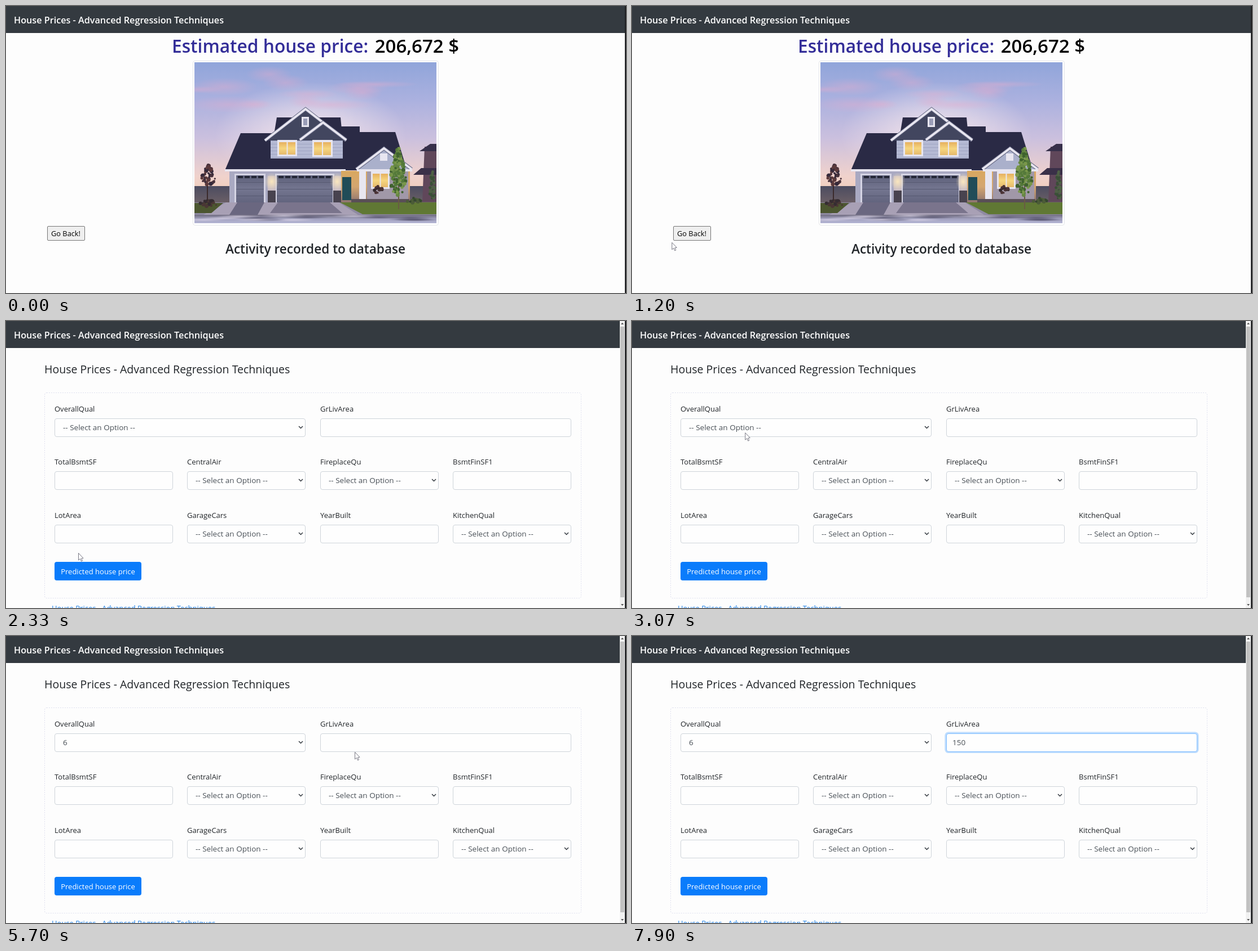
An HTML page with a canvas for the animation above (8 s loop, 1099x510 px).

```html
<!DOCTYPE html>
<html lang="en">
<head>
<meta charset="utf-8">
<title>House Prices</title>
<style>
html, body { margin: 0; width: 100%; height: 100%; overflow: hidden; background: #fdfdfd; }
canvas { display: block; width: 1099px; height: 510px; }
</style>
</head>
<body>
<canvas id="stage" width="1099" height="510"></canvas>
<script>
const LOOP = 8000, BLINK = 530;
const FONT = '"Open Sans", "Noto Sans", sans-serif';
const TITLE = 'House Prices - Advanced Regression Techniques';
const OPTION = '-- Select an Option --';
const INK = '#212529', FIELD_INK = '#495057', TRIM = '#e8e6f0';
const ENTER = 600, PRESS = 2200, FORM = 2330, OPEN = 3570, PICK = 4300, BLUR = 5500, FOCUS = 5940;
const KEYS = [6700, 6800, 7370];
// each move: start, end, x, y
const MOVES = [
  [ENTER, 1330, 73, 418], [1470, 1770, 128, 412], [2400, 3230, 203, 190],
  [4600, 5030, 614, 220], [5030, 5400, 618, 206], [5700, 6000, 622, 190]
];
// a star marks a drop-down
const ROWS = [
  'OverallQual* GrLivArea',
  'TotalBsmtSF CentralAir* FireplaceQu* BsmtFinSF1',
  'LotArea GarageCars* YearBuilt KitchenQual*'
];

const stage = document.getElementById('stage');
let g = stage.getContext('2d');
const clamp = v => Math.min(1, Math.max(0, v));

function rect(x, y, w, h, color) {
  g.fillStyle = color;
  g.fillRect(x, y, w, h);
}

function shade(x, y, w, h, ...stops) {
  const fill = g.createLinearGradient(0, y, 0, y + h);
  stops.forEach((c, i) => fill.addColorStop(i / (stops.length - 1), c));
  rect(x, y, w, h, fill);
}

function paint(fill, stroke, width = 1) {
  if (fill) { g.fillStyle = fill; g.fill(); }
  if (stroke) { g.strokeStyle = stroke; g.lineWidth = width; g.stroke(); }
}

function poly(points, ...style) {
  g.beginPath();
  for (let i = 0; i < points.length; i += 2) g.lineTo(points[i], points[i + 1]);
  paint(...style);
}

function box(x, y, w, h, r, ...style) {
  g.beginPath();
  g.roundRect(x, y, w, h, r);
  paint(...style);
}

// trapezoid between two horizontal edges
function slab(l0, r0, y0, l1, r1, y1, color) {
  poly([l0, y0, r0, y0, r1, y1, l1, y1], color);
}

function text(str, x, y, size, color, weight = 400, align = 'left') {
  g.font = `${weight} ${size}px ${FONT}`;
  g.textAlign = align;
  g.fillStyle = color;
  g.fillText(str, x, y);
}

function seeded(seed) {
  return () => (seed = seed * 16807 % 2147483647) / 2147483647;
}

// soft elliptical glow; rgb is "r,g,b"
function glow(x, y, rx, ry, rgb, alpha) {
  g.save();
  g.translate(x, y);
  g.scale(rx, ry);
  const soft = g.createRadialGradient(0, 0, 0, 0, 0, 1);
  soft.addColorStop(0, `rgba(${rgb},${alpha})`);
  soft.addColorStop(1, `rgba(${rgb},0)`);
  rect(-1, -1, 2, 2, soft);
  g.restore();
}

function foliage(x, y, rx, ry, ...colors) {
  const rnd = seeded(x);
  for (let i = 0; i < rx * ry / 5; i++) {
    const a = rnd() * 6.28, d = Math.sqrt(rnd()), v = Math.sin(a) * d;
    g.beginPath();
    g.arc(x + Math.cos(a) * d * rx * (0.65 + 0.35 * v), y + v * ry, 1.5 + rnd() * 2, 0, 7);
    paint(colors[i % colors.length]);
  }
}

function sky() {
  shade(334, 100, 429, 270, '#90a5da', '#abb1df', '#cbc0de', '#f0d2cc', '#f0c8a2');
  glow(540, 230, 170, 95, '250,236,238', 0.9);
  const rnd = seeded(11);
  for (let i = 0; i < 12; i++) {
    glow(340 + rnd() * 330, 115 + rnd() * 75, 30 + rnd() * 50, 6 + rnd() * 12, '230,172,204', 0.4);
  }
}

function ground() {
  shade(334, 320, 429, 30, '#4c4c60', '#6b5f66');
  rect(334, 349, 429, 37, '#8f8aa2');
  slab(390, 590, 349, 350, 624, 371, '#a8a0b5');
  slab(410, 458, 349, 396, 446, 371, '#6a6780');
  slab(482, 574, 349, 468, 596, 368, '#7a748c');
  slab(334, 385, 350, 334, 364, 368, '#4c5630');
  slab(592, 763, 349, 632, 763, 370, '#607834');
  shade(334, 371, 429, 15, '#706c80', '#a3a2c0', '#b4b5d4');
  const rnd = seeded(5);
  for (let i = 0; i < 14; i++) {
    glow(350 + rnd() * 400, 372 + rnd() * 12, 40, 3, i % 2 ? '75,72,98' : '225,218,236', 0.7);
  }
}

function pane(x, y, w, h) {
  rect(x, y, w, h, TRIM);
  shade(x + 3, y + 4, w - 6, h - 7, '#e6b060', '#f6d67f', '#e5b96c');
  rect(x + w / 2 - 1, y + 3, 2, h - 6, TRIM);
}

function garage(x, w) {
  rect(x - 3, 298, w + 6, 51, '#d5d4e4');
  shade(x, 301, w, 48, '#5d607a', '#747690', '#62647e');
  for (let y = 313; y < 349; y += 12) rect(x, y, w, 1, '#565971');
  for (let i = 3; i < w - 9; i += 12) rect(x + i, 302, 9, 4, '#252838');
}

function gable(cx, top, half, rise, fill) {
  const edge = [cx - half, top + rise, cx, top, cx + half, top + rise];
  poly(edge, fill);
  poly(edge, null, '#686b86', 6);
  poly(edge, null, TRIM, 4);
}

function house() {
  const roof = '#2a2a45', attic = '#42465f', wall = '#b5bad4';
  slab(480, 593, 198, 468, 600, 271, roof);
  rect(590, 214, 37, 20, roof);
  slab(416, 600, 226, 388, 602, 292, roof);
  slab(590, 690, 224, 590, 711, 292, roof);
  rect(469, 233, 128, 38, wall);
  for (let y = 239; y < 271; y += 6) rect(469, y, 128, 1, '#9fa5c3');
  gable(531, 183, 72, 56, attic);
  rect(524, 197, 13, 18, TRIM);
  rect(527, 200, 7, 12, '#9a9db7');
  gable(562, 207, 41, 31, attic);
  slab(469, 600, 271, 469, 602, 291, roof);
  pane(481, 238, 35, 29);
  pane(543, 238, 36, 30);
  rect(396, 293, 200, 56, '#a9a9c2');
  rect(388, 290, 214, 4, TRIM);
  garage(408, 49);
  garage(480, 99);
  for (const x of [464, 580]) {
    rect(x, 302, 14, 47, '#c8bcc4');
    rect(x, 328, 14, 21, '#48434f');
    glow(x + 7, 312, 13, 16, '255,235,190', 0.9);
  }
  shade(594, 293, 122, 56, '#d9a860', '#d4a670', '#8d7470');
  rect(596, 304, 16, 41, '#214c58');
  gable(670, 253, 49, 37, '#aab0cb');
  rect(663, 262, 13, 13, TRIM);
  rect(622, 290, 98, 4, TRIM);
  rect(626, 294, 12, 55, TRIM);
  rect(640, 294, 73, 55, '#a198a8');
  pane(647, 294, 33, 31);
  rect(612, 343, 103, 6, '#594f56');
}

function plants() {
  slab(742, 763, 250, 738, 763, 348, '#60475a');
  slab(752, 763, 245, 733, 763, 258, '#37304a');
  slab(736, 763, 288, 722, 763, 300, '#3a3048');
  rect(356, 310, 2, 40, '#3b2a2c');
  rect(695, 280, 2, 81, '#695b43');
  foliage(756, 319, 7, 25, '#3b4f38', '#4e6045');
  foliage(358, 300, 17, 18, '#47313b', '#5c3a3c', '#34293a');
  foliage(358, 350, 22, 6, '#352c32', '#4a3735');
  foliage(660, 326, 11, 7, '#33282e', '#4b3336');
  foliage(695, 294, 19, 42, '#54793a', '#79974a', '#40632f', '#678844');
  foliage(722, 346, 20, 5, '#35472f', '#4c5c37');
}

function paintPhoto() {
  const sheet = document.createElement('canvas'), screen = g;
  sheet.width = stage.width;
  sheet.height = stage.height;
  g = sheet.getContext('2d');
  g.beginPath();
  g.rect(334, 100, 429, 286);
  g.clip();
  sky();
  ground();
  house();
  plants();
  g = screen;
  return sheet;
}
const photo = paintPhoto();

function pointer(t) {
  if (t < ENTER || t >= KEYS[0]) return null;
  let x = -12, y = 476;
  for (const [from, to, nx, ny] of MOVES) {
    const ease = 1 - (1 - clamp((t - from) / (to - from))) ** 2;
    x += (nx - x) * ease;
    y += (ny - y) * ease;
  }
  return { x, y };
}

const inside = (p, x, y, w, h) => p && p.x >= x && p.x <= x + w && p.y >= y && p.y <= y + h;

const POINTERS = {
  arrow() {
    poly([0.5, 0.5, 0.5, 13, 3.5, 10.5, 5.5, 15, 7.5, 14, 5.5, 10, 9, 9.5, 0.5, 0.5], '#fff', '#777783');
  },
  hand() {
    box(-4, 7, 12, 10, 4, '#fff', '#777783');
    box(-1.5, 0.5, 3, 11, 1.5, '#fff', '#777783');
    rect(-1, 8, 8, 5, '#fff');
  },
  beam() {
    rect(-0.5, -7, 1, 15, '#333');
    for (const y of [-7, 7]) rect(-3, y, 6, 1, '#333');
  }
};

function navbar(w) {
  rect(0, 0, w, 48, '#343a40');
  text(TITLE, 14, 31, 16.2, '#fff', 600);
}

function resultPage(t, p) {
  navbar(1097);
  text('Estimated house price:', 294, 83, 31.7, '#332d98', 600);
  text('206,672 $', 803, 83, 33, '#000', 600, 'right');
  box(331.5, 97.5, 435, 292, 3.5, '#fff', '#e3e5e9');
  g.drawImage(photo, 0, 0);
  const over = inside(p, 73, 391, 67, 26);
  const fill = t >= PRESS ? '#f5f5f5' : over ? '#e4e4e4' : '#efefef';
  box(73.5, 391.5, 66, 25, 1.5, fill, over ? '#5c5c5c' : '#767676');
  text('Go Back!', 106, 409, 12.8, '#000', 400, 'center');
  text('Activity recorded to database', 548.5, 440, 22.6, INK, 600, 'center');
  return over ? 'hand' : 'arrow';
}

function field(label, x, y, w, isSelect, value, focus) {
  text(label, x, y - 12, 13, INK);
  if (focus > 0) box(x - 0.8, y - 0.8, w + 1.6, 34, 4.5, null, `rgba(0,123,255,${0.25 * focus})`, 3.6);
  box(x + 0.5, y + 0.5, w - 1, 32, 3.5, '#fefefe', focus > 0.5 ? '#80bdff' : '#ced4da');
  text(value, x + (isSelect ? 15 : 11), y + 21, 13.5, FIELD_INK);
  if (isSelect) poly([x + w - 12, y + 14, x + w - 8.5, y + 17.5, x + w - 5, y + 14], null, '#343a40', 1.5);
}

function fields(t, typed) {
  const values = { OverallQual: t >= PICK ? '6' : OPTION, GrLivArea: typed };
  const focus = {
    OverallQual: t < BLUR ? clamp((t - OPEN) / 130) : 0,
    GrLivArea: clamp((t - FOCUS) / 150)
  };
  ROWS.forEach((row, r) => row.split(' ').forEach((name, i, all) => {
    const step = 941.3 / all.length, label = name.replace('*', ''), isSelect = label !== name;
    field(label, Math.round(86 + i * step), Math.round(173 + r * 94.3), Math.round(step - 25.5),
      isSelect, values[label] ?? (isSelect ? OPTION : ''), focus[label] || 0);
  }));
}

function caret(t, typed) {
  const last = [FOCUS, ...KEYS].filter(k => t >= k).pop();
  if (!last || (t - last) % (2 * BLINK) >= BLINK) return;
  g.font = `400 13.5px ${FONT}`;
  rect(Math.round(568 + g.measureText(typed).width), 182, 1, 15, FIELD_INK);
}

function scrollbar() {
  rect(1088, 0, 9, 510, '#f1f1f1');
  rect(1089, 10, 7, 481, '#c1c1c1');
  for (const [y, d] of [[4.5, -1.5], [504.5, 1.5]]) {
    poly([1090, y - d, 1092.5, y + d, 1095, y - d], '#505050');
  }
}

function formPage(t, p) {
  navbar(1088);
  text(TITLE, 68, 93, 19.5, INK);
  g.setLineDash([2, 2]);
  box(68.5, 127.5, 951, 365, 3.5, null, '#dfe1ef');
  g.setLineDash([]);
  const typed = '150'.slice(0, KEYS.filter(k => t >= k).length);
  fields(t, typed);
  caret(t, typed);
  box(86, 428, 154, 33, 4, '#0a7cfb');
  text('Predicted house price', 163, 450, 13, '#fff', 400, 'center');
  text(TITLE, 81, 514.5, 13, '#1b7fe8');
  scrollbar();
  return inside(p, 557, 173, 445, 32) ? 'beam' : 'arrow';
}

function draw(t) {
  rect(0, 0, 1099, 510, '#fdfdfd');
  const p = pointer(t);
  const kind = t < FORM ? resultPage(t, p) : formPage(t, p);
  if (p) {
    g.save();
    g.translate(p.x, p.y);
    POINTERS[kind]();
    g.restore();
  }
  rect(1097, 0, 2, 510, '#1c1d20');
}

const start = performance.now();
function tick() {
  draw((performance.now() - start) % LOOP);
  requestAnimationFrame(tick);
}
tick();
</script>
</body>
</html>
```
